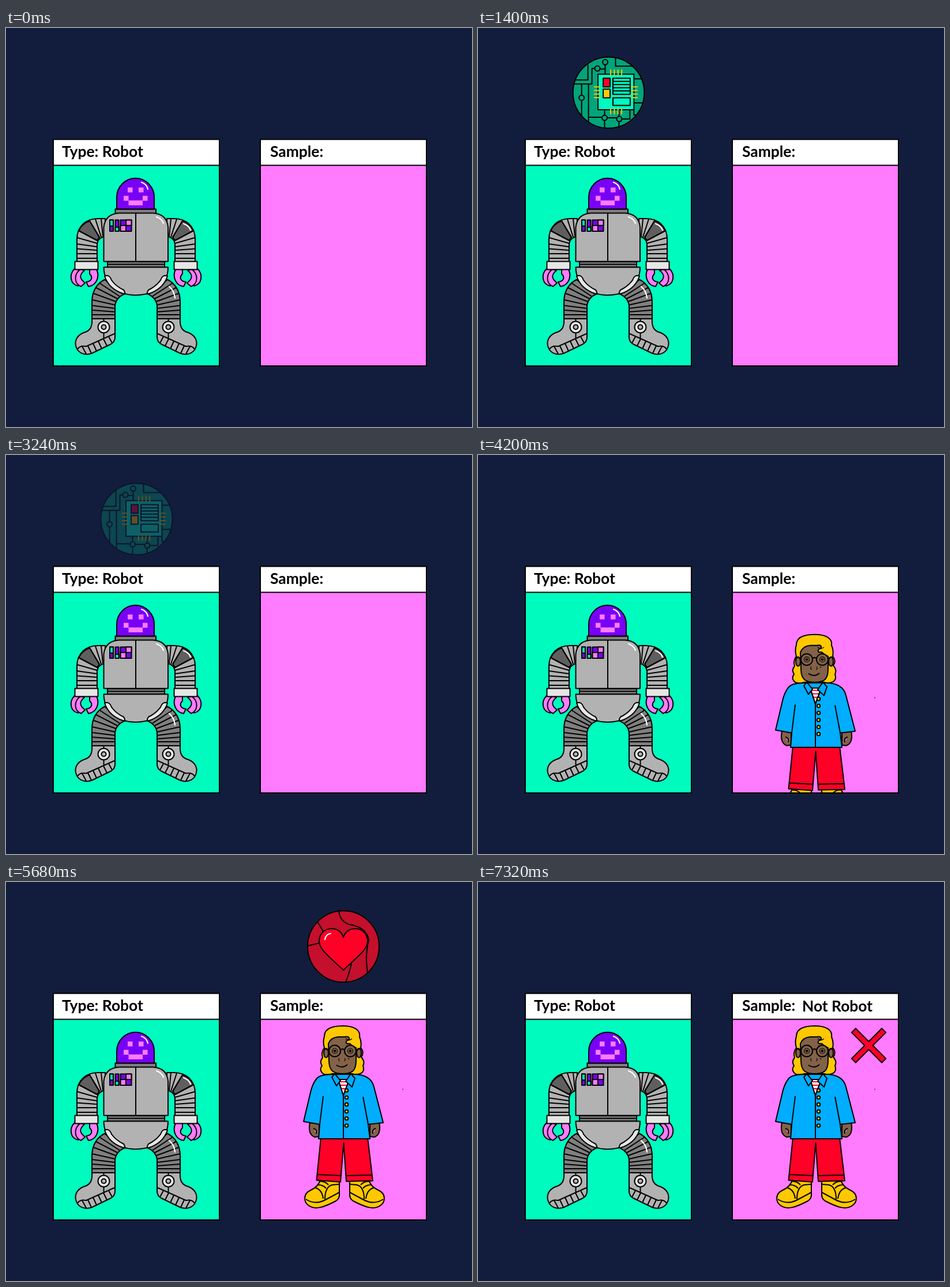
An HTML page for the animation above (8 s loop, 808 by 693 pixels).

```html
<!DOCTYPE html>
<html lang="en">
<head>
<meta charset="utf-8">
<title>Robot or not</title>
<style>
  html, body { margin: 0; width: 100%; height: 100%; overflow: hidden; background: #121d3d; }
  svg { display: block; width: 100%; height: 100%; }
  .ink { stroke: #000; stroke-width: 2; stroke-linejoin: round; }
  .line { fill: none; }
  .thin { stroke-width: 1.2; }
  .shine { fill: none; stroke: #fff; stroke-width: 2.2; stroke-linecap: round; }
  .grey { fill: #b2b2b2; } .dark { fill: #7f7f7f; } .pale { fill: #e6e6e6; }
  .pink { fill: #ff7bff; } .mint { fill: #00fbbf; } .violet { fill: #7800f5; }
  .gold { fill: #ffc800; } .red { fill: #ff0027; } .skin { fill: #826248; } .blue { fill: #00adff; }
  text { font: 700 26.4px Lato, "Open Sans", sans-serif; }
</style>
</head>
<body>
<svg viewBox="0 0 808 693">
  <defs>
    <clipPath id="window"><rect x="441" y="239" width="287" height="347"/></clipPath>
    <clipPath id="disc"><circle r="62"/></clipPath>

    <g id="limbs">
      <!-- arm -->
      <path class="grey" d="M172 331H160C138 331 123 345 123 367V406H158V376Q159 364 172 362Z"/>
      <path d="M126 352Q132 340 145 335L162 363L158 369Z" fill="#5f5f5f"/>
      <path class="line" d="M165 331L168 362M155 332L165 363M145 335L162 364M126 352L158 369M123 364L158 374M123 375L158 380M123 383.500L158 386M123 392H158M123 400H158"/>
      <!-- claw -->
      <g class="pink">
        <path d="M119 418C109 428 111 445 125 448L130 442C120 439 120 429 128 420Z"/>
        <path d="M129 419C117 428 118 444 130 449L137 443L132 438C127 432 129 427 136 421Z"/>
        <path d="M145 419H157C163 432 157 447 143 449L139 441C149 440 151 433 145 427Z"/>
      </g>
      <rect class="pale" x="119.500" y="405.500" width="40" height="14"/>
      <!-- leg -->
      <path class="dark" d="M173 436C157 443 149 458 149 476V506H189V484C189 474 196 465 208 461Z"/>
      <path class="line" d="M171 437L203 462M162 443L197 466M156 451L193 470M152 461L190 475M149 472L189 481M149 482L189 487M149 490L189 493M149 498H189"/>
      <!-- boot -->
      <path class="grey" d="M149 505C150 519 146 526 135 529C122 534 118 545 122 555C126 566 139 569 149 565L182 549Q189 545 189 537V505Z"/>
      <path class="line" d="M124 558Q128 551 139 553L188 531M169.500 505V540M132 553L139 566M142 552L148 565M151 548L157 561M160 544L166 557M169 540L175 552M178 536L184 547"/>
      <circle class="pale" cx="169.500" cy="519.500" r="10"/>
      <circle class="grey" cx="169.500" cy="519.500" r="4"/>
    </g>

    <path id="trim" class="pale" d="M171 431Q179 427 183 438Q191 449 204 455Q209 463 202 461C188 456 176 446 171 431Z"/>

    <g id="feet">
      <path class="skin" d="M527 418Q523 438 535 443L543 442V418ZM533 428Q540 430 538 437"/>
      <path class="gold" d="M545 517C543 526 536 532 527 536C515 542 516 556 525 562C536 570 551 565 572 554Q579 550 578 540V517Z"/>
      <path class="line" d="M520 551Q535 561 552 553L578 539M536 531Q548 534 550 550M541 526Q550 526 555 532M545 520Q554 520 559 526M553 551Q553 529 566 526L578 525"/>
    </g>
  </defs>

  <!-- cards -->
  <g class="ink">
    <path class="mint" d="M82 238H370V587H82Z"/>
    <path class="pink" d="M441 238H729V587H441Z"/>
    <path fill="#fff" d="M82 193.500H370V238.500H82ZM441 193.500H729V238.500H441Z"/>
  </g>
  <text x="97" y="224">Type: Robot</text>
  <text x="458" y="224">Sample:</text>
  <text id="verdict" x="562" y="225">Not Robot</text>

  <!-- robot -->
  <g class="ink">
    <use href="#limbs"/>
    <use href="#limbs" transform="matrix(-1 0 0 1 451 0)"/>
    <path class="dark" d="M176 406H275V415.500H176ZM176 410.500H275"/>
    <path class="grey" d="M169.500 415.500H281C281 445 258 464 225 464S170 445 169.500 415.500Z"/>
    <use href="#trim"/>
    <use href="#trim" transform="matrix(-1 0 0 1 451 0)"/>
    <path class="dark" d="M189.500 314.500H260V322H189.500Z"/>
    <path class="violet" d="M192 314.500V294A32.500 33 0 0 1 257 294V314.500Z"/>
    <path class="grey" d="M169.500 405.500V346Q172 323 196 321.500H255Q279 323 281 346V405.500ZM225 321.500V405.500"/>
    <path class="violet" d="M180 333.500H186V353H180ZM189.500 333.500H195.500V353H189.500ZM198.500 333.500H217.500V353H198.500Z"/>
    <path class="mint" d="M180 333.500H186V344H180ZM189.500 346H195.500V353H189.500Z"/>
    <path class="pink" d="M208 333.500H217.500V343H208ZM198.500 343H208V353H198.500Z"/>
  </g>
  <path class="pink" d="M211 277h8.500v8.500h-8.500ZM230 277h8.500v8.500h-8.500ZM204 291.500h8.500v8h24.500v-8h8.500v8.500h-8.500v8h-24.500v-8h-8.500Z"/>
  <path class="shine" d="M235 268Q244 271 246 280M261 328Q270 331 273 339M308 340Q317 343 320 351M283 449Q292 457 293 469"/>

  <!-- person -->
  <g clip-path="url(#window)">
    <g id="person" class="ink">
      <path class="gold" d="M552 288Q549 278 552 268C552 253 568 250 584 250C602 250 615 256 613 269Q617 278 615 288C620 294 619 300 616 304Q623 312 619 319Q622 328 616 332Q608 336 600 333H566Q552 337 548 331Q543 326 548 319Q543 312 549 305Q546 296 552 288Z"/>
      <path class="skin" d="M571 325V338L585 352L597 338V325Z"/>
      <ellipse class="skin" cx="555" cy="297" rx="4" ry="8"/>
      <ellipse class="skin" cx="612" cy="297" rx="4" ry="8"/>
      <path class="skin" d="M559 281Q563 270 576 269H588Q596 267 595 274Q587 276 591 281Q597 279 600 285L607 288V310C607 328 600 333 584 333S560 328 560 310Z"/>
      <path class="line" d="M552 289L560 292M607 292L614 289M580 292Q583 288 587 292M573 318Q583 325 592 317"/>
      <path class="line thin" d="M578 306Q575 310 579 311M587 306Q590 310 586 311M589 272Q595 277 600 272"/>
      <circle class="skin" cx="570" cy="293.500" r="10"/>
      <circle class="skin" cx="597" cy="293.500" r="10"/>
      <circle class="line thin" cx="570" cy="293.500" r="4.500"/>
      <circle class="line thin" cx="597" cy="293.500" r="4.500"/>
      <g stroke="none">
        <circle cx="570" cy="293.500" r="2.200"/><circle cx="597" cy="293.500" r="2.200"/>
        <circle cx="594" cy="307" r="1"/><circle cx="688" cy="360" r=".8"/>
      </g>

      <use href="#feet"/>
      <use href="#feet" transform="matrix(-1 0 0 1 1174 0)"/>
      <path class="red" d="M546 444L538.500 518L580 521L585.500 453L590 520L636 519L627 444ZM540 508L581 510M589 510L635 509"/>
      <path class="blue" d="M568 334Q546 334 539 341Q533 348 529 361L516 416L544 421L542 446H631L628 421L654 418L638 356Q633 334 602 334ZM550 372L544 421M619 373L628 421"/>
      <path fill="#fff" d="M576 343H595L585 371Z"/>
      <path d="M578 347H593M580 353H591M582 359H589" stroke="#ff0027"/>
      <path class="line" d="M576 343L585 371L595 343M585 371V446"/>
      <path class="blue" d="M570 333L565 339L573 354L580 345ZM598 333L605 341L600 356L589 346Z"/>
      <g id="buttons" class="gold"></g>
    </g>
  </g>

  <!-- circuit badge -->
  <g id="chip" class="ink">
    <circle r="62" fill="#00a57b"/>
    <g clip-path="url(#disc)">
      <path class="line" d="M-60 -22H-36V-52M-24 -42H-29V-15H-62M-6 -49V-41H-15M-6 -41V-32M-47 4V-15M-47 14V52M-35 -15V56M-35 43H-12M-7 39V30M-3 44H14M-7 49V64M18 41V30M23 46H37V30M18 50V62M12 -62V-46H48M44 -24H64M44 18H60M44 30V39H60"/>
      <g fill="#00a57b">
        <circle cx="-6" cy="-53" r="4.500"/><circle cx="-19.500" cy="-42" r="4.500"/>
        <circle cx="-47" cy="9" r="4.500"/><circle cx="-7" cy="44" r="4.500"/><circle cx="18.500" cy="46" r="4.500"/>
      </g>
    </g>
    <path class="mint" d="M-18.500 -32H44V30H-18.500Z"/>
    <path id="pins" class="line" style="stroke:#ffc800"/>
    <path id="lampA" d="M-9.500 -25h12v15h-12Z"/>
    <path id="lampB" d="M-9.500 -6h12v15h-12Z"/>
    <path class="mint" d="M7.500 -25H37.500V3H7.500ZM7.500 -19.500H37.500M7.500 -14H37.500M7.500 -8.500H37.500M7.500 -3H37.500M7.500 9H37.500V22.500H7.500Z"/>
  </g>

  <!-- heart badge -->
  <g id="heart" class="ink">
    <circle r="62" fill="#c40f2d"/>
    <path class="line" clip-path="url(#disc)" d="M-8 -62Q-6 -43 11 -38Q39 -34 44 -12Q37 18 42 46M-45 -43L-33 -23M-62 -1L-38 -7M14 28Q11 45 4 62"/>
    <g id="beat">
      <path class="red" d="M0 -16C-3 -26 -12 -32 -22 -31C-35 -30 -42 -20 -42 -9C-41 5 -31 12 0 41C31 12 41 5 42 -9C42 -20 35 -30 22 -31C12 -32 3 -26 0 -16Z"/>
      <path class="shine" d="M-32 -12Q-31 -21 -22 -22.500"/>
    </g>
  </g>

  <path id="cross" class="ink red" d="M-37 -5H-5V-37H5V-5H37V5H5V37H-5V5H-37Z"/>
</svg>
<script>
  const LOOP = 8000, STEP = 40;
  const el = id => document.getElementById(id);
  const ramp = (t, from, to) => Math.min(1, Math.max(0, (t - from) / (to - from)));
  const easeOut = p => 1 - (1 - p) ** 1.95;
  const easeInOut = p => p < .5 ? 8 * p ** 4 : 1 - 8 * (1 - p) ** 4;
  const mix = (a, b, p) => a + (b - a) * p;

  el('buttons').innerHTML = [0, 1, 2, 3, 4, 5]
    .map(i => `<circle cx="590.5" cy="${362 + i * 12.2}" r="2.8"/>`).join('');
  el('pins').setAttribute('d', [0, 1, 2, 3].map(i => {
    const x = 3.5 + i * 6.4, y = -10 + i * 6.3;
    return `M${x} -40v10M${x} 28v10M-25.5 ${y}h11M39.5 ${y}h11`;
  }).join(''));

  const place = (id, x, y, scale, rotate = 0) =>
    el(id).setAttribute('transform', `translate(${x} ${y}) rotate(${rotate}) scale(${scale})`);

  // Badge grows out of the chest, rests above the card, then fades.
  function badge(id, t, { x, from, to, rise, fade }) {
    const p = easeInOut(ramp(t, rise, rise + 560));
    place(id, x, mix(from, to, p), p);
    el(id).style.opacity = 1 - ramp(t, fade, fade + 520);
  }

  function draw(t) {
    badge('chip', t, { x: 226.5, from: 374, to: 111.3, rise: 920, fade: 2880 });
    const swapped = t >= 1680 && t < 2240 && Math.floor((t - 1680) / 112) % 2 === 0;
    el('lampA').style.fill = swapped ? '#ffc800' : '#ff0027';
    el('lampB').style.fill = swapped ? '#ff0027' : '#ffc800';

    place('person', 0, 340 * (1 - easeOut(ramp(t, 3920, 4400))), 1);

    badge('heart', t, { x: 585, from: 392, to: 112, rise: 5000, fade: 6480 });
    place('beat', 0, 0, 1.075 - .075 * Math.cos((t - 5680) / 560 * 2 * Math.PI));

    const grow = easeOut(ramp(t, 6840, 7080)), settle = easeInOut(ramp(t, 7080, 7320));
    place('cross', 677.5, 284, mix(grow * 1.23, 1, settle), 45);
    el('verdict').style.opacity = t >= 6880 ? 1 : 0;
  }

  const start = performance.now();
  function tick() {
    const t = Math.max(0, performance.now() - start) % LOOP;
    draw(Math.floor(t / STEP) * STEP);
    requestAnimationFrame(tick);
  }
  tick();
</script>
</body>
</html>
```
